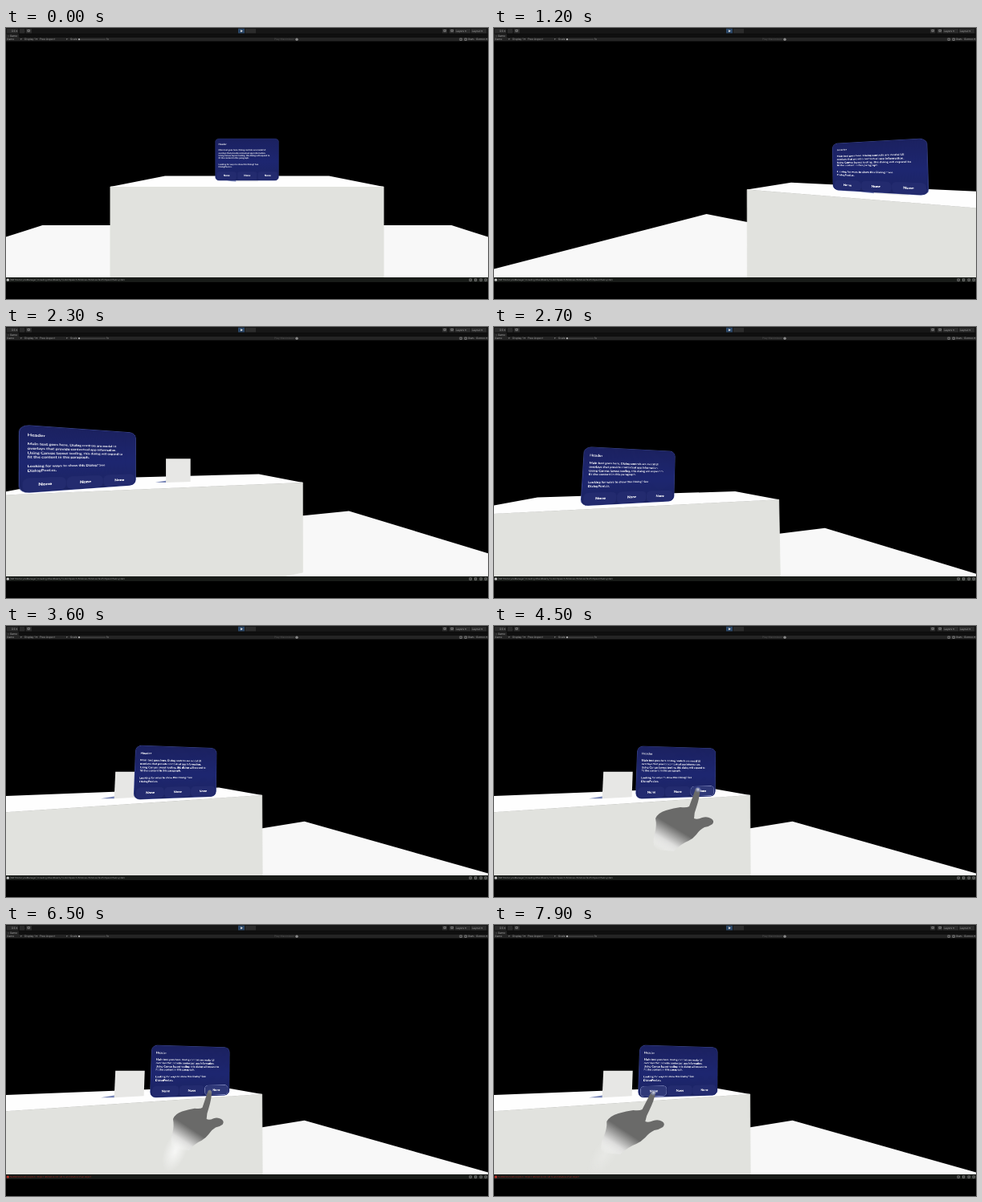
An HTML page for the animation above (8000 ms loop, 600 by 338 pixels).

```html
<!DOCTYPE html>
<html lang="en">
<head>
<meta charset="utf-8">
<style>
  html, body { margin: 0; width: 100%; height: 100%; overflow: hidden; background: #000; }
  svg { position: absolute; left: 0; top: 0; }
  text { font: 3.3px Inter, sans-serif; fill: #a2a2a2; text-rendering: geometricPrecision; }
  #dialog {
    position: absolute; left: 0; top: 0; width: 200px; height: 133px; box-sizing: border-box;
    transform-origin: 0 0; border-radius: 14px; border: 1.5px solid #3c478f;
    background: linear-gradient(#1b2160, #1d2670 55%, #1c2462); color: #fff;
    font: 700 6.7px/8.75px Lato, sans-serif; white-space: pre; text-rendering: geometricPrecision;
  }
  #dialog b { position: absolute; left: 10.5px; top: 14px; font-size: 7.6px; }
  #dialog p { position: absolute; left: 10.5px; top: 32px; margin: 0; }
  #dialog i {
    position: absolute; top: 103px; width: 63px; height: 27px; box-sizing: border-box;
    border: 1.5px solid #222a6e; border-radius: 9px; background: #232b6f;
    font: 900 8px/24px Lato, sans-serif; text-align: center;
  }
  #dialog i.hover { background: #2f3878; border-color: #8d95c8; }
</style>
</head>
<body>
<svg width="600" height="338" viewBox="0 0 600 338">
  <polygon id="floor" fill="#f8f8f8"/>
  <polygon id="front" fill="#e1e2de" stroke="#e1e2de" stroke-width=".8"/>
  <polygon id="top" fill="#fefefe"/>
  <polygon id="shadow" fill="#7482b4"/>
  <polygon id="cube" fill="#e7e7e5"/>
  <g id="bars">
    <path fill="#161616" d="M0 0H600V7.500H0z"/>
    <path fill="#0f0f0f" d="M0 7.500H600V12H0z"/>
    <path fill="#242424" d="M0 7.500H16V12H0zM0 12H600V16.500H0z"/>
    <path fill="#000" d="M0 317H600V338H0z"/>
    <path fill="#181b18" d="M0 311H600V317H0z"/>
    <path fill="#2c4868" d="M289 .7H297V6.500H289z"/>
    <path fill="#ddd" d="M292 2.200L295 3.700L292 5.200zM299.300 2.200h.7v3h-.7zM301 2.200h.7v3h-.7zM306 2.200L308.500 3.700L306 5.200zM309 2.200h.6v3h-.6z"/>
    <path fill="#aaa" d="M18 5h4.500a1 1 0 0 0-.7-2a1.600 1.600 0 0 0-3 .3z"/>
    <circle cx="4.500" cy="3.700" r="1.600" fill="#aaa"/>
    <circle cx="362" cy="14.200" r="1.700" fill="#888"/>
    <path stroke="#666" stroke-width=".6" d="M92 14.200H124"/>
    <circle cx="91" cy="14.200" r="1.100" fill="#bbb"/>
  </g>
  <circle id="dot" cx="2.300" cy="314.200" r="1.600"/>
  <text id="status" x="5" y="315.300" style="font-size:2.800px"></text>
</svg>

<div id="dialog"><b>Header</b><p>Main text goes here. Dialog controls are modal UI
overlays that provide contextual app information.
Using Canvas layout tooling, this dialog will expand to
fit the content in this paragraph.

Looking for ways to show this Dialog? See
DialogPool.cs.</p><i style="left:4px">None</i><i style="left:68px">None</i><i style="left:132px">None</i></div>

<svg width="600" height="311" viewBox="0 0 600 311">
  <defs>
    <linearGradient id="skin" gradientUnits="userSpaceOnUse" x1="-28" y1="50" x2="-46" y2="80">
      <stop stop-color="#6a6a69"/><stop offset=".55" stop-color="#dcdcdb"/><stop offset="1" stop-color="#fff" stop-opacity="0"/>
    </linearGradient>
    <radialGradient id="haze"><stop stop-color="#fff" stop-opacity=".9"/><stop offset="1" stop-color="#fff" stop-opacity="0"/></radialGradient>
    <radialGradient id="glow"><stop stop-color="#eef2ff"/><stop offset="1" stop-color="#7c92ff" stop-opacity="0"/></radialGradient>
  </defs>
  <g id="hand">
    <ellipse id="arm" cx="-50" cy="80" rx="16" ry="30" transform="rotate(25 -50 80)" fill="url(#haze)"/>
    <path fill="url(#skin)" d="M-3 1Q0-2 2.500 2Q2 12-2 24Q-5 31-5 38Q-1 40 5 37Q11 35 16 38Q21 41 18 45Q14 48 8 49Q2 52-2 58Q-6 63-12 66Q-22 70-30 79L-54 77Q-57 66-54 57Q-51 47-53 38Q-50 31-40 28Q-30 25-22 24Q-14 25-11 23Q-7 12-3 1z"/>
    <circle id="tip" cx="0" cy="2" r="4" fill="url(#glow)"/>
  </g>
</svg>

<script>
const LOOP = 8000, STEP = 100;
const FOCAL = 254.6, CX = 300, CY = 164, NEAR = .05;
const LEAD = 15, FOLLOW = 2.1; // dialog lag: degrees allowed, catch-up per second
const $ = id => document.getElementById(id);
const mix = (a, b, k) => a + (b - a) * k;
const clamp = (v, lo, hi) => Math.min(hi, Math.max(lo, v));
const rad = deg => deg * Math.PI / 180;
function ease(t, from, to) {
  const u = clamp((t - from) / (to - from), 0, 1);
  return u * u * (3 - 2 * u);
}

// Head turns: time, yaw, pitch in degrees
const looks = [[900, 0, 0], [1300, -44, 2.4], [2000, -40.6, 2.4], [2350, 22, 0], [2700, 21.8, 4.9], [3100, 29.6, 4.1]];
function look(t) {
  let [, yaw, pitch] = looks[0];
  for (let i = 1; i < looks.length; i++) {
    const k = ease(t, looks[i - 1][0], looks[i][0]);
    yaw = mix(yaw, looks[i][1], k);
    pitch = mix(pitch, looks[i][2], k);
  }
  return { yaw, pitch };
}

// Direction of the dialog, which trails behind the view
function dialogAngle(t) {
  let angle = 0;
  const dt = 20, gain = 1 - Math.exp(-FOLLOW * dt / 1000);
  for (let s = 0; s < t; s += dt) {
    const { yaw } = look(s);
    angle += (clamp(angle, yaw - LEAD, yaw + LEAD) - angle) * gain;
  }
  return rad(angle);
}

// World geometry, seen from the origin: y up, z ahead
const W = .668, TOP = -.1335, FRONT = 1, BACK = 1.667, GROUND = -.644, FLOOR = 2;
const CUBE = .067, CUBE_Z = 1.24;
const flat = (y, ...xz) => xz.map(([x, z]) => [x, y, z]);
const upright = (w, y0, y1, z) => [[-w, y1, z], [w, y1, z], [w, y0, z], [-w, y0, z]];
const solids = {
  floor: flat(GROUND, [-FLOOR, FLOOR], [FLOOR, FLOOR], [FLOOR, -FLOOR], [-FLOOR, -FLOOR]),
  front: upright(W, GROUND, TOP, FRONT),
  top: flat(TOP, [-W, BACK], [W, BACK], [W, FRONT], [-W, FRONT]),
  shadow: flat(TOP, [-CUBE, CUBE_Z], [-.125, 1.27], [-CUBE, 1.36]),
  cube: upright(CUBE, TOP, .002, CUBE_Z)
};

function project(points, { yaw, pitch }) {
  const [sy, cy, sp, cp] = [Math.sin(rad(yaw)), Math.cos(rad(yaw)), Math.sin(rad(pitch)), Math.cos(rad(pitch))];
  const view = points.map(([x, y, z]) => {
    const ahead = x * sy + z * cy;
    return [x * cy - z * sy, y * cp - ahead * sp, ahead * cp + y * sp];
  });
  const visible = view.flatMap((a, i) => {
    const b = view[(i + 1) % view.length], out = a[2] > NEAR ? [a] : [];
    if (a[2] > NEAR !== b[2] > NEAR) {
      const k = (NEAR - a[2]) / (b[2] - a[2]);
      out.push(a.map((v, j) => mix(v, b[j], k)));
    }
    return out;
  });
  return visible.map(([x, y, z]) => [CX + FOCAL * x / z, CY - FOCAL * y / z]);
}

// Perspective matrix that maps a w by h box onto four corners
function quadMatrix(w, h, [[x0, y0], [x1, y1], [x2, y2], [x3, y3]]) {
  const dx1 = x1 - x2, dx2 = x3 - x2, sx = x0 - x1 + x2 - x3;
  const dy1 = y1 - y2, dy2 = y3 - y2, sy = y0 - y1 + y2 - y3;
  const det = dx1 * dy2 - dx2 * dy1;
  const g = (sx * dy2 - dx2 * sy) / det, q = (dx1 * sy - sx * dy1) / det;
  return `matrix3d(${[
    (x1 - x0 + g * x1) / w, (y1 - y0 + g * y1) / w, 0, g / w,
    (x3 - x0 + q * x3) / h, (y3 - y0 + q * y3) / h, 0, q / h,
    0, 0, 1, 0, x0, y0, 0, 1].map(v => v.toFixed(8))})`;
}

function addBars() {
  const box = (x, y, w, h, fill, stroke = 'none') =>
    `<rect x="${x}" y="${y}" width="${w}" height="${h}" fill="${fill}" stroke="${stroke}" stroke-width=".7"/>`;
  const label = (x, y, s, fill = '#a2a2a2') => `<text x="${x}" y="${y}" style="fill:${fill}">${s}</text>`;
  let out = '';
  for (const [x, w] of [[1, 14], [17, 6], [25, 7], [298, 13], [543, 6], [552, 6], [559, 19], [579, 19]])
    out += box(x, 1, w, 5.5, '#2b2b2b');
  for (const [x, y] of [[27, 2.3], [545, 2.3], [554, 2.3], [565, 13], [571, 13], [577, 313], [583.5, 313], [590, 313], [596, 313]])
    out += box(x, y, 2.3, 2.3, 'none', '#999');
  out += label(7, 5, 'DS ▾') + label(560, 5, 'Layers ▾') + label(580, 5, 'Layout ▾') + label(2, 11, '◦ Game');
  for (const [x, s] of [[1, 'Game'], [18, '▾'], [23, 'Display 1 ▾'], [42, 'Free Aspect'], [75, '▾'], [80, 'Scale'], [125, '1x'], [575, 'Stats'], [585, 'Gizmos ▾']])
    out += label(x, 15.4, s);
  $('bars').insertAdjacentHTML('beforeend', out + label(334, 15.4, 'Play Maximized ▾', '#555'));
}

const buttons = document.querySelectorAll('#dialog i');

function draw(t) {
  const camera = look(t);
  for (const id in solids) $(id).setAttribute('points', project(solids[id], camera).join(' '));

  const a = dialogAngle(t), size = 1 + .14 * ease(t, 1500, 2700);
  const panel = upright(.157 * size, -.104 * size, .104 * size, 1)
    .map(([x, y, z]) => [x * Math.cos(a) + z * Math.sin(a), y, z * Math.cos(a) - x * Math.sin(a)]);
  $('dialog').style.transform = quadMatrix(200, 133, project(panel, camera));

  // The hand rises to the right button, leans in, then slides to the left one
  const slide = ease(t, 6500, 7900), lean = ease(t, 5000, 6000) * (1 - slide);
  const x = 254 - 55 * slide, y = 202 + 30 * (1 - ease(t, 3800, 4400)) + 4 * lean + 5 * slide;
  $('hand').setAttribute('transform', `matrix(${1 - .13 * lean} 0 ${-.15 * slide} ${1 - .05 * lean} ${x} ${y})`);
  $('hand').setAttribute('opacity', ease(t, 3800, 4100));
  $('arm').setAttribute('opacity', .8 * lean + .25 * slide);
  $('tip').setAttribute('opacity', t < 4300 ? 0 : .85 - .65 * lean);
  const hovered = t < 4300 ? -1 : Math.round(2 - 2 * slide);
  buttons.forEach((b, i) => b.classList.toggle('hover', i === hovered));

  const failed = t >= 5900;
  $('status').textContent = failed
    ? 'NullReferenceException: Object reference not set to an instance of an object'
    : '[MRTKLifecycleManager] Creating MixedReality.Toolkit.Speech.Windows.WindowsTextToSpeechSubsystem';
  $('status').style.fill = failed ? '#a8271f' : '#a2a2a2';
  $('dot').setAttribute('fill', failed ? '#c0352b' : '#ccc');
}

function tick() {
  draw(Math.floor(performance.now() % LOOP / STEP) * STEP);
  requestAnimationFrame(tick);
}
addBars();
tick();
</script>
</body>
</html>
```
